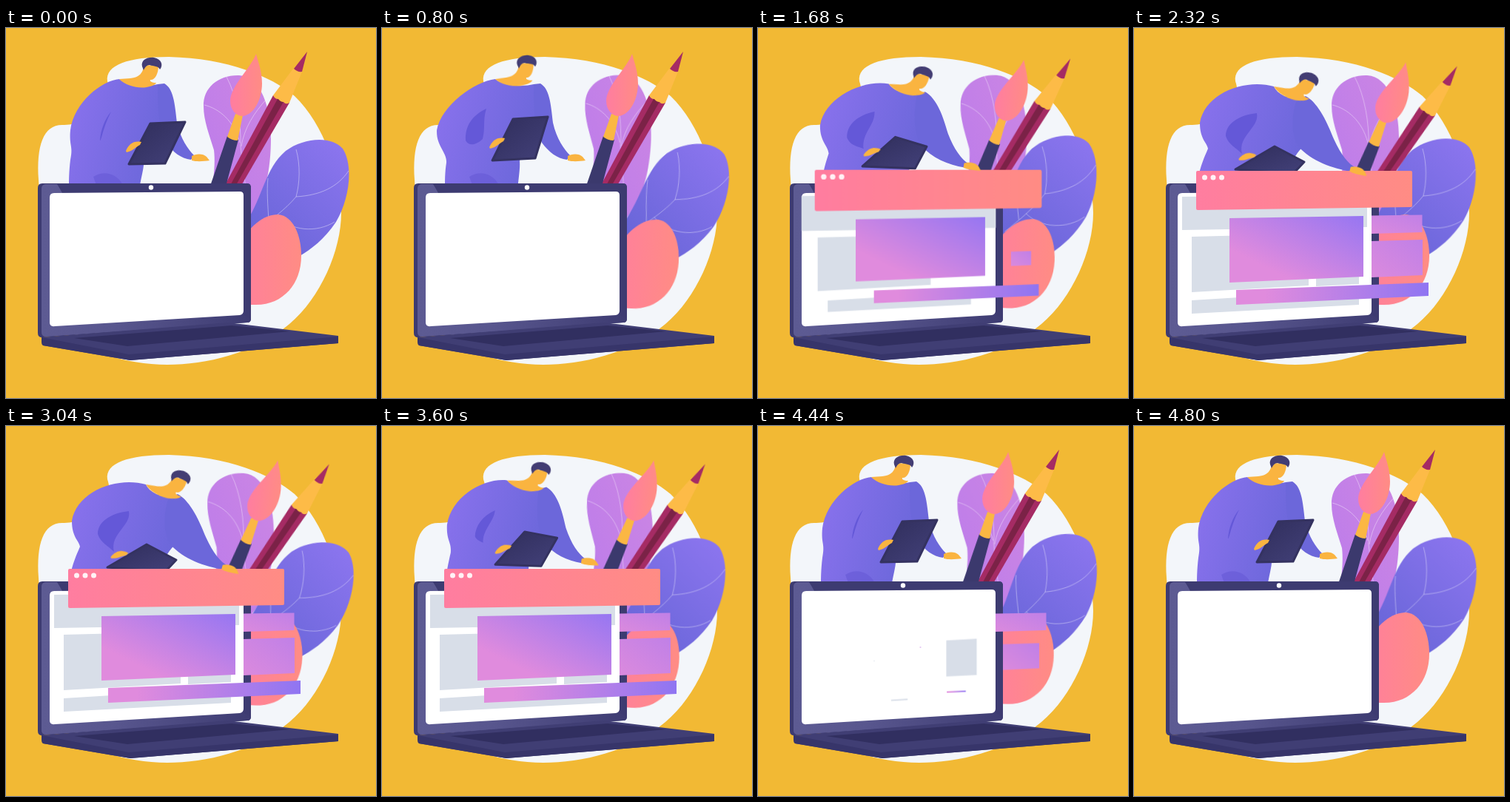
An HTML page for the animation above (4840 ms loop, 500 by 500 pixels).

```html
<!DOCTYPE html>
<html lang="en">
<head>
<meta charset="utf-8">
<title>Designer at a laptop</title>
<style>
html, body { margin: 0; height: 100%; overflow: hidden; background: #f2b934; }
svg { display: block; width: 100vw; height: 100vh; }

/* plants */
.sway { animation: 1210ms cubic-bezier(.37,0,.63,1) infinite alternate both; }
.lilac { transform-origin: 325px 290px; animation-name: lilac; }
.blue { transform-origin: 320px 305px; animation-name: blue; animation-delay: -605ms; }
.coral { transform-origin: 250px 345px; animation-name: coral; }
@keyframes lilac { to { transform: rotate(3.1deg); } }
@keyframes blue { from { transform: rotate(-3.4deg); } to { transform: rotate(3.4deg); } }
@keyframes coral { to { transform: rotate(4.4deg); } }
.vein { fill: none; stroke: #fff; stroke-opacity: .4; stroke-width: 1; }

/* tools and person share the main loop */
.act { animation: 4840ms cubic-bezier(.45,0,.55,1) infinite both; }
.brush { transform-origin: 238px 335px; animation-name: brush; }
.pencil { transform-origin: 193px 389px; animation-name: pencil; }
@keyframes brush {
  0%, 25.62%, 92.56%, 100% { transform: rotate(0deg); }
  40.08%, 78.1% { transform: rotate(5.7deg); }
}
@keyframes pencil {
  0%, 27.48%, 91.12%, 100% { transform: rotate(0deg); }
  41.94%, 76.65% { transform: rotate(4.9deg); }
}

.torso { animation-name: torso; }
.arm { animation-name: arm; }
.fold { animation-name: fold; }
.tablet { animation-name: tablet; }
.head { transform-origin: 153px 69px; animation-name: head; }
.grip { transform-origin: 172px 160px; animation-name: grip; }
.reach { transform-origin: 252px 176px; animation-name: reach; }
@keyframes torso {
  0%, 81.8%, 100% { d: path("M153 69C130 71 92 100 87 138C85 160 91 158 87 178C85 195 85 205 85 222L180 222C181 205 187 190 186 180C190 160 210 150 228 120C226 95 222 84 205 76C190 80 165 78 153 69Z"); }
  17.5%, 21.7% { d: path("M153 69C125 72 80 105 74 138C73 160 88 168 87 182C85 195 85 205 85 222L183 222C184 205 187 190 186 180C190 160 210 150 228 120C226 95 222 84 205 76C190 80 165 78 153 69Z"); }
  43.8%, 66.1% { d: path("M189 79C150 68 96 88 89 128C89 150 98 154 100 163C95 175 90 185 86 206L215 222C215 205 215 190 212 185C218 172 222 165 235 155C260 120 245 95 232 95C215 98 195 92 189 79Z"); }
}
@keyframes arm {
  0%, 21.7%, 81.8%, 100% { d: path("M214 75C226 82 228 100 231 128C236 150 246 164 254 172L250 178C236 176 226 168 216 155C205 130 205 100 205 76Z"); }
  43.8%, 66.1% { d: path("M232 92C250 102 262 130 270 150C280 172 290 184 300 189L294 194C268 190 240 180 222 160C210 140 215 110 220 97Z"); }
}
@keyframes fold {
  0%, 81.8%, 100% { d: path("M142 113C133 124 128 138 127 152C128 152 128 150 129 148C132 136 136 125 142 113Z"); }
  17.5%, 21.7% { d: path("M141 109C122 118 112 132 113 152C118 162 130 156 136 150C140 135 136 125 141 109Z"); }
  43.8%, 66.1% { d: path("M166 115C140 118 124 130 124 146C128 158 138 162 146 170C140 145 170 135 166 115Z"); }
}
@keyframes tablet {
  0%, 81.8%, 100% { d: path("M195 129L242 127L215 183L166 184Z"); }
  17.5%, 21.7% { d: path("M177 123L224 120L207 176L149 179Z"); }
  43.8%, 66.1% { d: path("M190 160L230 181L215 197L137 191Z"); }
}
@keyframes head {
  0%, 81.8%, 100% { transform: none; }
  17.5%, 21.7% { transform: translate(0, 0) rotate(-4deg); }
  43.8%, 66.1% { transform: translate(36px, 10px) rotate(13deg); }
}
@keyframes grip {
  0%, 81.8%, 100% { transform: none; }
  17.5%, 21.7% { transform: translate(-17px, -5px) rotate(0deg); }
  43.8%, 66.1% { transform: translate(-19px, 14px) rotate(18deg); }
}
@keyframes reach {
  0%, 21.7%, 81.8%, 100% { transform: none; }
  43.8%, 66.1% { transform: translate(41px, 15px) rotate(15deg); }
}

/* page blocks pop in one after another */
.pop {
  transform-box: fill-box; transform-origin: center;
  animation: pop 4840ms ease-in-out var(--wait, 0ms) infinite both;
}
.p2 { --wait: 80ms; }
.p3 { --wait: 120ms; }
.p4 { --wait: 230ms; }
.p5 { --wait: 400ms; }
@keyframes pop {
  0%, 26.45% { transform: scale(0); }
  34.71% { transform: scale(1.05); }
  38.84%, 84.92% { transform: scale(1); }
  90.5%, 100% { transform: scale(0); }
}
</style>
</head>
<body>
<svg viewBox="0 0 500 500">
  <defs>
    <linearGradient id="gLilac" x1="1" y1="0" x2="0" y2="1"><stop stop-color="#cc86e3"/><stop offset="1" stop-color="#b97aec"/></linearGradient>
    <linearGradient id="gBlue" x1="1" y1="0" x2=".3" y2="1"><stop stop-color="#8e76f0"/><stop offset="1" stop-color="#6564d6"/></linearGradient>
    <linearGradient id="gCoral" x1="0" y1="0" x2="1" y2="0"><stop stop-color="#ff7da0"/><stop offset="1" stop-color="#ff8c84"/></linearGradient>
    <linearGradient id="gShirt" x1="0" y1=".3" x2="1" y2=".6"><stop stop-color="#8871ec"/><stop offset="1" stop-color="#6866d8"/></linearGradient>
    <linearGradient id="gTablet" x1="0" y1="0" x2="1" y2="1"><stop stop-color="#2f2d5a"/><stop offset="1" stop-color="#43417a"/></linearGradient>
    <linearGradient id="gBezel" x1="0" y1="0" x2="1" y2="0"><stop stop-color="#5d5b93"/><stop offset=".35" stop-color="#58568e"/><stop offset="1" stop-color="#3e3c72"/></linearGradient>
    <linearGradient id="gPanel" x1="0" y1="1" x2="1" y2="0"><stop offset=".25" stop-color="#e08bdd"/><stop offset="1" stop-color="#9676f2"/></linearGradient>
    <linearGradient id="gBar" x1="0" y1="0" x2="1" y2="0"><stop offset=".15" stop-color="#e08bdd"/><stop offset="1" stop-color="#8f75f2"/></linearGradient>
    <linearGradient id="gTile" x1="0" y1="1" x2="1" y2="0"><stop stop-color="#db8add"/><stop offset="1" stop-color="#c080e7"/></linearGradient>
  </defs>

  <path fill="#f3f6fa" d="M76 131C110 131 150 110 137 72C134 50 165 39 220 39C300 41 358 65 390 92C430 130 453 200 453 250C453 300 425 365 383 400C335 440 270 455 218 455C160 454 110 440 80 400C60 350 46 250 44 205C41 160 50 131 76 131Z"/>

  <g class="sway lilac">
    <path fill="url(#gLilac)" d="M267 106C266 80 288 63 315 64C345 66 358 108 358 150C358 190 350 232 331 254L310 290L270 260C278 225 284 190 281 165C275 145 267 125 267 106Z"/>
    <path class="vein" d="M298 66C312 92 318 130 317 160C320 190 325 220 328 250M268 104C288 109 308 125 316 155M352 96C335 115 322 135 318 160"/>
  </g>
  <g class="sway blue">
    <path fill="url(#gBlue)" d="M325 262C347 228 350 190 378 166C402 148 440 145 455 163C470 186 464 232 446 262C430 286 412 299 397 308L325 340Z"/>
    <path class="vein" d="M335 276C355 262 378 245 392 228C425 226 448 215 463 193M392 164C398 185 397 210 392 228M354 203C352 220 354 240 355 261M365 253C385 275 420 277 444 262"/>
  </g>
  <path class="sway coral" fill="url(#gCoral)" d="M310 300C330 266 348 252 368 252C388 254 399 280 399 308C399 345 375 374 338 374L300 374Z"/>

  <g class="act pencil">
    <path fill="#a52b64" d="M361 91L383 101L302 240L281 240Z"/>
    <path fill="#7b2247" d="M368 94L376 98L295 240L288 240Z"/>
    <path fill="#fdbb47" d="M388 55L400 59L383 101Q378 104 375 100Q371 100 368 96Q363 96 361 91Z"/>
    <path fill="#a52b64" d="M407 32L389 55Q394 60 400 59Z"/>
  </g>
  <g class="act brush">
    <path fill="#3b396d" d="M299 146L314 151L294 225L272 225Z"/>
    <path fill="#fbb743" d="M310 116L320 118L313 152Q305 152 299 147Z"/>
    <path fill="url(#gCoral)" d="M338 35C330 55 304 78 303 98C303 112 312 119 320 119C336 117 346 95 346 75C346 58 341 47 338 35Z"/>
  </g>

  <g>
    <path class="act torso" fill="url(#gShirt)"/>
    <path fill="#6659d6" opacity=".6" d="M118 201C130 193 148 194 158 212L122 212Z"/>
    <path class="act arm" fill="#6c67da"/>
    <path class="act fold" fill="#6458d8"/>
    <g class="act head">
      <path fill="#fab440" d="M186 50C186 60 180 67 168 68L153 69C162 78 178 82 190 80C196 79 202 77 203 74C197 74 194 72 195 70C201 71 206 62 206 51Z"/>
      <path fill="#433d73" d="M184 52C182 44 190 39 200 40C210 42 213 50 208 56C206 51 200 52 194 50C190 50 188 53 186 57Z"/>
    </g>
    <path class="act tablet" fill="url(#gTablet)" stroke="#343260" stroke-width="3" stroke-linejoin="round"/>
    <path class="act grip" fill="#fab440" d="M162 166C166 157 172 152 183 154L181 158C176 160 172 166 163 168Z"/>
  </g>

  <g>
    <path fill="#3d3b71" d="M49 210H326Q331 210 331 216V393Q331 398 326 398L50 418Q43 419 43 412V216Q43 210 49 210Z"/>
    <path fill="url(#gBezel)" d="M53 211H69L77 223H321V388L331 393Q331 398 326 398L54 417Q48 417 48 411V217Q48 212 53 211Z"/>
    <path fill="#3d3b71" d="M69 210H326Q331 210 331 216V393L321 385V223H76Z"/>
    <path fill="#fff" d="M65 223L316 221Q321 221 321 226V382Q321 387 316 388L66 403Q59 404 59 398V229Q59 223 65 223Z"/>
    <circle cx="196" cy="215.500" r="3.200" fill="#fff"/>
    <path fill="#403e74" d="M48 418L300 398L449 416V426L168 449L50 429Z"/>
    <path fill="#312f60" d="M92 419L305 402L384 410L164 430Z"/>
    <path fill="#37356a" d="M48 418L166 441L449 417V426L168 449L50 429Q48 428 48 424Z"/>
  </g>

  <g fill="#d8dee8">
    <path class="pop" d="M65 228L315 225V269L65 273Z"/>
    <path class="pop p2" d="M78 282L236 278V348L78 357Z"/>
    <path class="pop p4" d="M246 280L304 277V346L246 349Z"/>
    <path class="pop p3" d="M78 368L304 354V374L78 386Z"/>
  </g>
  <path class="pop p4" fill="url(#gTile)" d="M321 288L390 286V334L321 337Z"/>
  <path class="pop p5" fill="url(#gTile)" d="M321 253.500L389.500 252.500V276L321 278Z"/>
  <path class="pop p2" fill="url(#gPanel)" d="M129 257L310 254V336L129 344Z"/>
  <path class="pop p3" fill="url(#gBar)" d="M138 354L398 344V362L138 374Z"/>
  <g class="pop">
    <path fill="url(#gCoral)" d="M86 193H374Q376 193 376 195V240Q376 242 374 242L86 246Q84 246 84 244V195Q84 193 86 193Z"/>
    <g fill="#fff" fill-opacity=".9"><circle cx="95.500" cy="202" r="3.500"/><circle cx="107" cy="202" r="3.500"/><circle cx="118.500" cy="202" r="3.500"/></g>
  </g>

  <path class="act reach" fill="#fab440" d="M251 173C256 170 266 169 271 174L275 179C268 180 258 181 251 179Z"/>
</svg>
</body>
</html>
```
